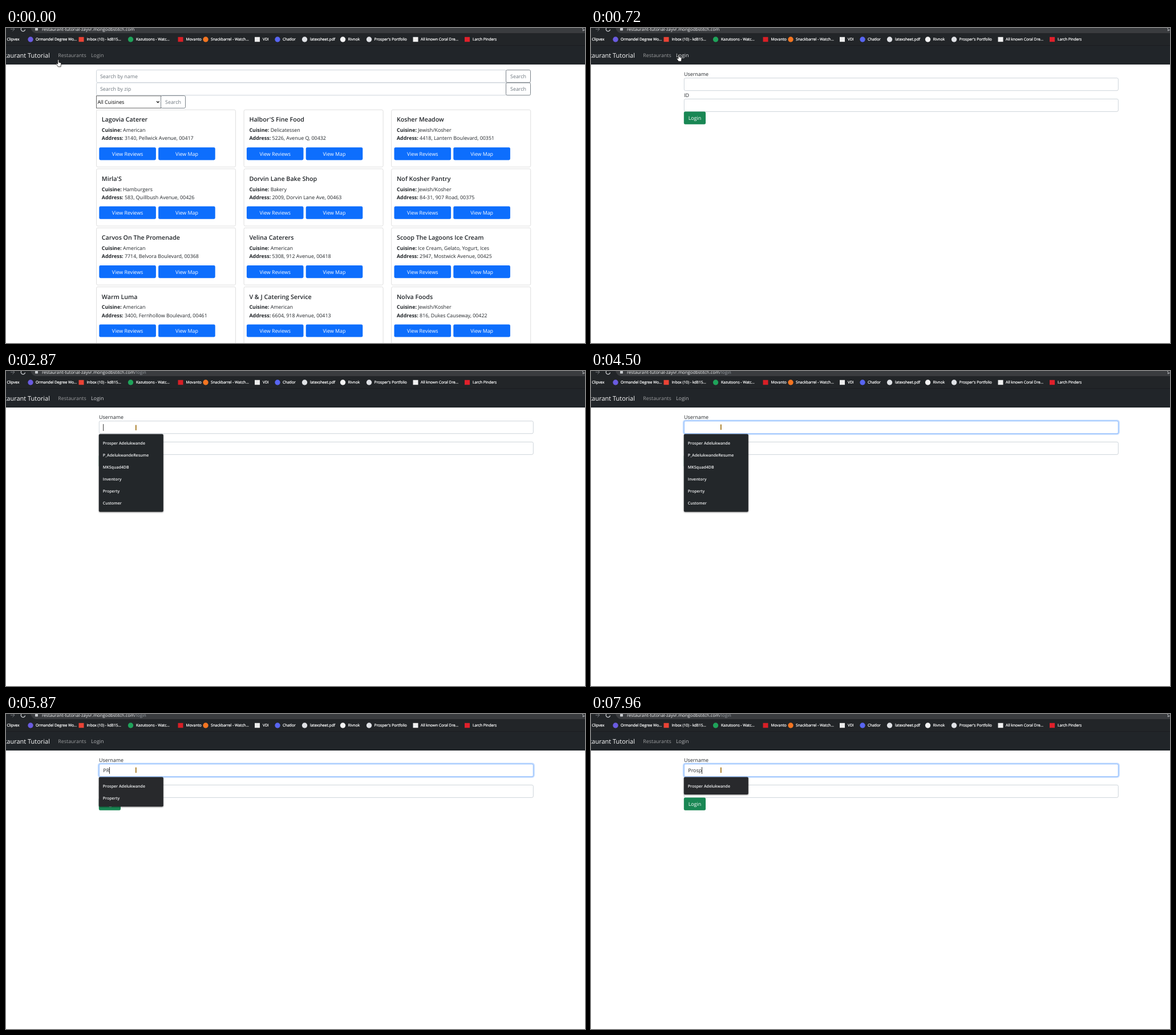
Recreate the animation shown at these times as an HTML page. Size 1015 by 552 pixels, loop 8 s.

```html
<!DOCTYPE html>
<html lang="en">
<head>
<meta charset="utf-8">
<title>Restaurant Tutorial</title>
<style>
  html, body { margin: 0; width: 100%; height: 100%; overflow: hidden; background: #fff; }
  svg { display: block; width: 100%; height: 100%; }
  text { font: 8.9px "Open Sans", "Noto Sans", sans-serif; fill: #212529; text-rendering: geometricPrecision; white-space: pre; }
  .b { font-weight: 700; }
  .title { font-size: 10.7px; font-weight: 600; }
  .brand { font-size: 11px; fill: #fff; }
  .mark { font-size: 6.65px; fill: #fff; stroke: #fff; stroke-width: .22px; }
  .url { font-size: 7.76px; fill: #f8f9fa; }
  .route { fill: #9aa0a6; }
  .item { font-size: 7px; font-weight: 600; fill: #f4f5f6; }
  .white { fill: #fff; }
  .black { fill: #000; }
  .grey { fill: #6c757d; }
  .nav { fill: #9b9d9f; }
  .drop { filter: drop-shadow(0 1px 1.2px rgba(0, 0, 0, .45)); }
</style>
</head>
<body>
<svg id="stage" viewBox="0 0 1015 552" preserveAspectRatio="none"></svg>
<script>
const LOOP = 8000;
const stage = document.getElementById('stage');

const text = (x, y, str, cls = '', extra = '') => `<text x="${x}" y="${y}" class="${cls}" ${extra}>${str}</text>`;
const centered = (x, y, str, cls) => text(x, y, str, cls, 'text-anchor="middle"');
const rect = (x, y, w, h, fill, r = 0, stroke = 'none', extra = '') =>
  `<rect x="${x}" y="${y}" width="${w}" height="${h}" rx="${r}" fill="${fill}" stroke="${stroke}" ${extra}/>`;
const circle = (x, y, r, fill) => `<circle cx="${x}" cy="${y}" r="${r}" fill="${fill}"/>`;
const path = (d, stroke, width = 1, fill = 'none') =>
  `<path d="${d}" stroke="${stroke}" stroke-width="${width}" fill="${fill}"/>`;

// Label, text x, icon x, icon colour, icon shape
const bookmarks = [
  ['Clipvex', 1.5],
  ['Ormandel Degree Wo...', 52, 43, '#6a5be0', 'o'],
  ['Inbox (10) - kd815...', 141.5, 132, '#ea4335'],
  ['Kazutoons - Watc...', 228, 218.5, '#1fa35a', 'o'],
  ['Movanto', 315.5, 306, '#d81f26'],
  ['Snackbarrel - Watch...', 359, 350, '#f47521', 'o'],
  ['VDI', 450, 440.5, '#ececec'],
  ['Chatlor', 485, 476, '#5865f2', 'o'],
  ['latexsheet.pdf', 533, 523.5, '#dfe1e5', 'o'],
  ['Rivnok', 599.5, 590.5, '#f4f4f4', 'o'],
  ["Prosper's Portfolio", 645.5, 636.5, '#dfe1e5', 'o'],
  ['All known Coral Dre...', 727, 718, '#f0f0f0'],
  ['Larch Pinders', 818, 808.5, '#e0202b']
];

const restaurants = [
  ['Lagovia Caterer', 'American', '3140, Pellwick Avenue, 00417'],
  ["Halbor'S Fine Food", 'Delicatessen', '5226, Avenue Q, 00432'],
  ['Kosher Meadow', 'Jewish/Kosher', '4418, Lantern Boulevard, 00351'],
  ["Mirla'S", 'Hamburgers', '583, Quillbush Avenue, 00426'],
  ['Dorvin Lane Bake Shop', 'Bakery', '2009, Dorvin Lane Ave, 00463'],
  ['Nof Kosher Pantry', 'Jewish/Kosher', '84-31, 907 Road, 00375'],
  ['Carvos On The Promenade', 'American', '7714, Belvora Boulevard, 00368'],
  ['Velina Caterers', 'American', '5308, 912 Avenue, 00418'],
  ['Scoop The Lagoons Ice Cream', 'Ice Cream, Gelato, Yogurt, Ices', '2947, Mostwick Avenue, 00425'],
  ['Warm Luma', 'American', '3400, Fernhollow Boulevard, 00461'],
  ['V &amp; J Catering Service', 'American', '6604, 918 Avenue, 00413'],
  ['Nolva Foods', 'Jewish/Kosher', '816, Dukes Causeway, 00422']
];

const PERSON = 'Prosper Adelukwande';
const RESUME = 'P_AdelukwandeResume';
const suggestions = {
  all: [PERSON, RESUME, 'MKSquad4DB', 'Inventory', 'Property', 'Customer'],
  three: [PERSON, RESUME, 'Property'],
  two: [PERSON, 'Property'],
  one: [PERSON]
};

const bookmark = ([label, x, iconX, color, shape]) => {
  const icon = !iconX ? '' : shape ? circle(iconX, 20, 4.7, color) : rect(iconX - 4.5, 15.8, 9, 8.4, color);
  return icon + text(x, 22.4, label, 'mark');
};

const chrome = () =>
  rect(0, 0, 1015, 31, '#222528') + rect(43, -14, 1000, 23, '#3a3c3f', 11) +
  path('M8 2H15M11.5 -1.5L15 2L11.5 5.5', '#777a7e') +
  path('M33 0A3.7 3.7 0 1 0 33.6 2.6', '#dfe1e5', 1.1) +
  rect(51, 0, 5, 4.4, '#c5c8cc', .6) +
  path('M1010 0L1012 2L1011.2 5L1015 3', '#b9bcc0') +
  bookmarks.map(bookmark).join('') +
  rect(0, 30, 1015, 1, '#1b1d20') + rect(0, 31, 1015, 33, '#212529') +
  text(77, 52, 'Restaurant Tutorial', 'brand', 'text-anchor="end"') +
  text(91.3, 51.2, 'Restaurants', 'nav');

const blueButton = (x, y, label) => rect(x, y, 99.6, 22.2, '#0d6efd', 2.4) + centered(x + 49.8, y + 14.5, label, 'white');

const card = ([name, cuisine, address], i) => {
  const x = 158.5 + (i % 3) * 258.6;
  const y = 143.4 + Math.floor(i / 3) * 103.4;
  const field = (dy, label, value) => text(x + 9.3, y + dy, `<tspan class="b">${label}:</tspan> ${value}`);
  return rect(x, y, 244, 100.2, '#fff', 2.4, '#dfdfdf') +
    text(x + 9.3, y + 21, name, 'title') +
    field(38.7, 'Cuisine', cuisine) + field(53, 'Address', address) +
    blueButton(x + 4.8, y + 65.8, 'View Reviews') + blueButton(x + 108.6, y + 65.8, 'View Map');
};

const searchButton = (x, y) =>
  rect(x, y, 43, 21.8, '#fff', 2.2, '#7b838a') + centered(x + 21.5, y + 14.4, 'Search', 'grey');
const searchRow = (y, label) =>
  rect(158.5, y, 718.5, 21.8, '#fff', 2.2, '#ced4da') + text(165, y + 14.4, label, 'grey') + searchButton(876.5, y);

const listPage = () =>
  searchRow(73.6, 'Search by name') + searchRow(96, 'Search by zip') +
  rect(158.5, 118.9, 113, 21.4, '#fff', 0, '#666') +
  text(160.5, 133.2, 'All Cuisines', 'black') +
  path('M264 128.4L266.3 130.8L268.6 128.4', '#111', 1.3) + searchButton(271.5, 118.6) +
  restaurants.map(card).join('');

const menu = items => {
  const pitch = 21.15;
  return rect(162.8, 110.6, 113, items.length * pitch + 9.3, items.length > 3 ? '#23272a' : '#28292c', 2, 'none', 'class="drop"') +
    items.map((item, i) => text(169.8, 128.6 + i * pitch, item, 'item')).join('');
};

const loginPage = ({ focus, list, typed }) =>
  text(163, 84.2, 'Username') +
  (focus ? rect(162, 86.6, 763.6, 24, 'none', 3.6, '#c2dbfe', 'stroke-width="2.4"') : '') +
  rect(163.3, 87.7, 761, 22, '#fff', 2.4, focus ? '#86b7fe' : '#ced4da') +
  text(163, 120.6, 'ID') +
  rect(163.3, 124.4, 761, 22, '#fff', 2.4, '#ced4da') +
  rect(162.8, 146.4, 38.2, 22.4, '#198754', 2.4) + centered(181.9, 161, 'Login', 'white') +
  text(170.3, 102, typed, '', 'id="typed"') +
  rect(170.2, 93, .9, 12, '#222', 0, 'none', 'id="caret" visibility="hidden"') +
  (list ? menu(suggestions[list]) : '');

const cursors = {
  hand: path('M3 1.2Q3-.1 4-.1T5 1.2V4.6L8 5.3Q9 5.6 9 6.7L8.2 12.3H3.6L.5 8Q-.2 6.6.9 6.4L3 7.6Z', '#111', .8, '#fff'),
  arrow: path('M0 0V10.2L2.4 8L4 11.6L5.6 10.9L4 7.4H7.2Z', '#111', .7, '#fff'),
  beam: rect(-1, 0, 2, 9.6, '#ad8230', .7)
};

// Each step changes only the listed parts of the state.
const steps = [
  [0, { page: 'list', route: '', login: '#9b9d9f', cursor: ['hand', 87.8, 55.6], typed: '' }],
  [120, { cursor: ['hand', 94, 53.5] }],
  [240, { cursor: ['hand', 114, 50] }],
  [360, { cursor: ['hand', 137, 47] }],
  [480, { cursor: ['hand', 149, 46], login: '#e8e9ea' }],
  [600, { cursor: ['hand', 150, 46.3] }],
  [720, { page: 'login' }],
  [840, { route: '/login', cursor: ['arrow', 294.5, 143.5], login: '#d0d2d4' }],
  [960, { cursor: ['arrow', 265, 187] }],
  [1230, { cursor: ['arrow', 258, 152] }],
  [1350, { cursor: ['beam', 244, 101] }],
  [1470, { cursor: ['beam', 239, 96] }],
  [1970, { cursor: ['beam', 323, 111] }],
  [2090, { cursor: ['beam', 262, 101] }],
  [2210, { cursor: ['beam', 227.8, 94.4] }],
  [2870, { list: 'all', caret: true }],
  [2990, { focus: true, login: '#b5b7b9' }],
  [3370, { caret: false }],
  [4000, { caret: true }],
  [4120, { cursor: ['beam', 227.8, 93.6] }],
  [4500, { caret: false }],
  [5000, { caret: true }],
  [5510, { typed: 'P', list: 'three' }],
  [5750, { typed: 'PR', list: 'two' }],
  [6110, { typed: 'PRo' }],
  [6880, { caret: false }],
  [7240, { typed: 'PR', caret: true }],
  [7360, { typed: 'P', list: 'three' }],
  [7480, { typed: 'Pr', list: 'two' }],
  [7600, { typed: 'Pro' }],
  [7840, { typed: 'Pros', list: 'one' }],
  [7960, { typed: 'Prosp' }]
];

stage.innerHTML = rect(0, 0, 1015, 552, '#fff') + chrome() + `<g id="list">${listPage()}</g><g id="live"></g>`;
const list = document.getElementById('list');
const live = document.getElementById('live');

function render(state) {
  const [kind, x, y] = state.cursor;
  const onList = state.page === 'list';
  list.style.display = onList ? '' : 'none';
  live.innerHTML =
    text(63, 4.6, `restaurant-tutorial-zayvr.mongodbstitch.com<tspan class="route">${state.route}</tspan>`, 'url') +
    text(149, 51.2, 'Login', '', `style="fill:${state.login}"`) +
    (onList ? '' : loginPage(state)) +
    `<g transform="translate(${x} ${y})">${cursors[kind]}</g>`;
  if (state.caret) {
    const caret = document.getElementById('caret');
    caret.setAttribute('x', 170.2 + document.getElementById('typed').getComputedTextLength());
    caret.setAttribute('visibility', 'visible');
  }
}

let shown = -1;
const start = performance.now();
function tick() {
  const time = (performance.now() - start) % LOOP;
  const past = steps.filter(([at]) => at <= time);
  if (past.length !== shown) {
    shown = past.length;
    render(Object.assign({}, ...past.map(step => step[1])));
  }
  requestAnimationFrame(tick);
}
tick();
</script>
</body>
</html>
```
